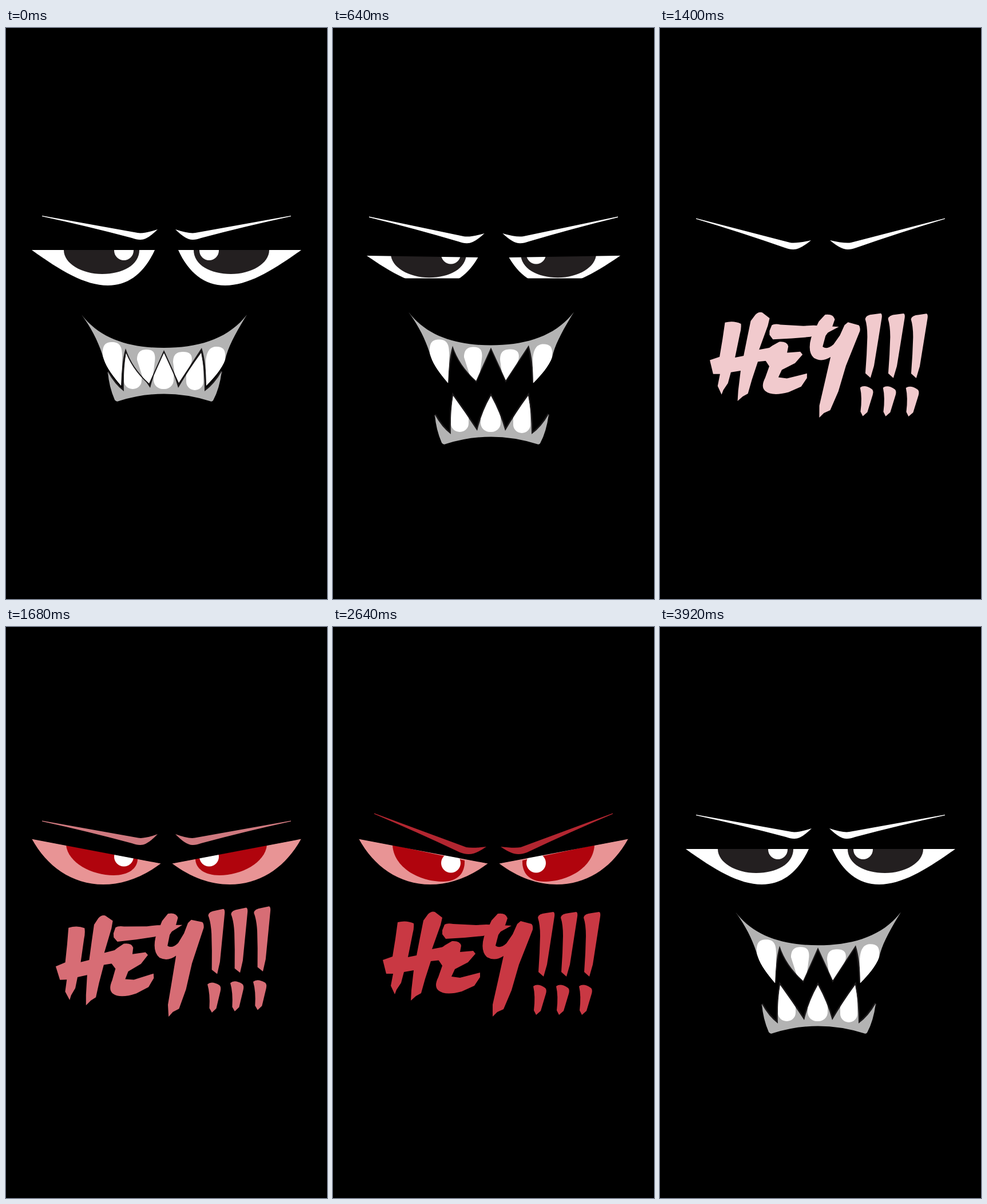
Animation of 561x998 px, one loop 3.96 s. Source, as an HTML page:

```html
<!DOCTYPE html>
<html lang="en">
<head>
<meta charset="utf-8">
<title>Hey!!!</title>
<style>
  html, body { margin: 0; width: 100%; height: 100%; overflow: hidden; background: #000; }
  svg { display: block; width: 100vw; height: 100vh; }
</style>
</head>
<body>
<svg viewBox="0 0 561 998" preserveAspectRatio="xMidYMid meet">
  <defs>
    <clipPath id="eyeClip"><path id="eyeEdge"/></clipPath>

    <g id="side">
      <path id="eye"/>
      <g clip-path="url(#eyeClip)">
        <path id="iris"/>
        <circle id="glint" cx="206" r="17" fill="#fff"/>
      </g>
      <path id="lids" fill="#000"/>
      <path id="brow"/>
    </g>

    <path id="upperShape" d="M132 501C164 543 215 559 276 559C337 559 389 543 421 501C402 532 388 557 383 580C377 596 364 611 350 625C350 600 348 578 342 559L302 620L276 563L250 621Q220 594 209 560C203 580 202 602 201 625C188 610 176 594 171 579C163 552 151 527 132 501Z"/>
    <path id="lowerShape" d="M178 601Q190 623 206 635Q205 596 210 568Q231 597 252 629Q260 596 276 568Q292 597 301 629Q319 598 341 568Q347 598 347 635Q364 623 377 600Q373 631 362 651Q360 654 356 652Q276 627 197 652Q193 654 190 650Q180 627 178 601Z"/>
    <clipPath id="upperClip"><use href="#upperShape"/></clipPath>
    <clipPath id="lowerClip"><use href="#lowerShape"/></clipPath>

    <g id="bang">
      <path d="M358 508Q359 501 372 500L385 498Q388 499 387 506L381 545L374 590L368 611L359 603L361 570L362 540Q362 520 358 508Z"/>
      <path d="M350 628Q358 622 371 631Q374 634 372 641L363 671L355 678L351 670Q354 645 350 628Z"/>
    </g>
  </defs>

  <rect width="561" height="998"/>
  <use href="#side"/>
  <use href="#side" transform="translate(561) scale(-1 1)"/>

  <g id="mouth" fill="#b3b3b3">
    <g id="lower">
      <path d="M178 601Q190 623 206 635Q205 596 210 568Q231 597 252 629Q260 596 276 568Q292 597 301 629Q319 598 341 568Q347 598 347 635Q364 623 377 600" fill="none" stroke="#1b191a" stroke-width="5"/>
      <use href="#lowerShape"/>
      <g clip-path="url(#lowerClip)" fill="#fff">
        <rect x="206" y="540" width="31" height="91" rx="15"/>
        <rect x="258" y="540" width="35" height="91" rx="16"/>
        <rect x="315" y="540" width="30" height="93" rx="15"/>
      </g>
    </g>
    <g id="upper">
      <path d="M201 625Q202 590 209 560Q220 594 250 621L276 563L302 620L342 559Q349 590 350 625" fill="none" stroke="#1b191a" stroke-width="4"/>
      <use href="#upperShape"/>
      <g clip-path="url(#upperClip)" fill="#fff">
        <path d="M169 572C168 554 174 549 185 549C198 549 203 556 203 572V640H169Z"/>
        <path d="M229 580C229 566 236 562 246 562C258 562 262 569 260 583L254 630H245Z"/>
        <path d="M292 584C292 570 299 566 310 566C322 566 327 572 324 585L306 630H298Z"/>
        <path d="M349 585C350 564 357 557 368 557C380 557 384 563 383 577L376 640H347Z"/>
      </g>
    </g>
  </g>

  <g id="word" role="img" aria-label="HEY!!!">
    <path d="M113 516Q128 512 141 518Q142 526 139 537L131 577L146 574L152 543L158 513L166 502Q172 496 178 498L191 508L188 521L173 563L204 557L190 582L171 584L161 615L154 640L145 645L136 653L137 635L141 600L124 603L119 622L111 634L108 642L101 627L105 606L93 606L87 582L104 576L109 545Z"/>
    <path d="M191 530L195 520Q200 517 210 519L250 521L268 520L312 522L290 534L262 540L230 543L197 545L191 537Z"/>
    <path d="M196 556L208 549Q222 548 224 557L222 568L245 566L249 571L236 586L213 598L207 611L222 613L257 604L257 612L247 627L225 637Q196 645 184 635Q176 628 184 612L191 592L183 580L185 564Z"/>
    <path d="M288 501Q302 499 305 509L301 521L289 538L284 557Q292 563 303 553L314 537L322 519L328 514L347 519Q350 522 349 529L340 552L325 590L312 635L298 668L287 673L279 681L279 660L288 620L298 575Q283 585 269 577Q257 566 264 541L277 513Z"/>
    <use href="#bang"/>
    <use href="#bang" x="40"/>
    <use href="#bang" x="80"/>
  </g>
</svg>

<script>
const LOOP = 3960, STEP = 40;
const WORD_IN = 1120, RED_IN = 1400, RESET = 3640;
const SHAKE = [0, 3.4, 7, -3.6];
const EYE = {
  white: "M45 388C95 424 138 450 178 450C214 450 242 428 260 388Z",
  red: "M45 370L271 413C238 438 203 450 170 450C115 450 71 418 45 370Z"
};
const WHITE_IRIS = "M101 360V388C101 412 133 430 168 430C204 430 233 414 233 388V360Z";
// Iris curve: start, then two cubic segments
const IRIS_CALM = [105, 381, 108, 412, 150, 434, 188, 434, 214, 434, 230, 422, 230, 405];
const IRIS_WIDE = [104, 381, 106, 420, 150, 445, 192, 445, 218, 445, 231, 430, 230, 408];
// Brow points: outer tip, upper corner, inner tip, lower corner
const BROW = {
  rest: [63, 328.5, 235, 359, 265, 352, 234, 370],
  low: [63, 333, 232, 376, 264, 371, 232, 387],
  red: [63, 339, 236, 369.5, 265, 362, 234, 381],
  raised: [72, 326, 238, 386, 268, 384, 236, 397]
};

const $ = id => document.getElementById(id);
const set = (id, attrs) => { for (const k in attrs) $(id).setAttribute(k, attrs[k]); };
const ramp = (t, a, b) => Math.min(1, Math.max(0, (t - a) / (b - a)));
const ease = x => (1 - Math.cos(Math.PI * x)) / 2;
const mix = (a, b, k) => a.map((v, i) => v + (b[i] - v) * k);
const tint = (a, b, k) => `rgb(${mix(a, b, k).map(Math.round)})`;
const WHITE = [255, 255, 255];

function browPath([tx, ty, cx, cy, ex, ey, bx, by]) {
  const midX = (tx + bx - 14) / 2, midY = (ty + by - 3) / 2 - 1.5;
  return `M${tx} ${ty - .6}L${cx - 5} ${cy - 1}Q${cx + 6} ${cy + 1} ${ex} ${ey}` +
    `Q${bx + 12} ${by + 1} ${bx} ${by}Q${bx - 6} ${by} ${bx - 14} ${by - 3}` +
    `Q${midX} ${midY} ${tx} ${ty + .8}Z`;
}

function lidPath(left, right, bottom) {
  return `M30 330H280V${right}L30 ${left}ZM30 ${bottom}H280V460H30Z`;
}

// 0 is open, 1 is shut
function blink(t) {
  if (t < 520) return ease(ramp(t, 400, 520));
  if (t < 1000) return 1 - ease(ramp(t, 540, 710));
  if (t < RED_IN) return ease(ramp(t, 1180, 1360));
  return 1 - ease(ramp(t, 1420, 1680));
}

function drawFace(t) {
  const red = t > RED_IN && t < RESET;
  const shut = t < RESET ? blink(t) : 0;
  const alert = ease(ramp(t, 2120, 2640)) * (1 - ease(ramp(t, 2640, 3200)));
  const shape = red ? EYE.red : EYE.white;
  set("eye", { d: shape, fill: red ? "#e89495" : "#fff" });
  set("eyeEdge", { d: shape });

  if (red) {
    const p = mix(IRIS_CALM, IRIS_WIDE, alert);
    set("iris", { d: `M${p.slice(0, 2)}C${p.slice(2)}Z`, fill: "#b0040d", transform: "" });
    set("glint", { cy: 401.5 + 11 * alert });
    set("lids", { d: lidPath(367.7 + 58 * shut, 415.3 + 58 * shut, 452 - 30 * shut) });
  } else {
    set("iris", { d: WHITE_IRIS, fill: "#231f20", transform: `translate(0 ${17 * shut})` });
    set("glint", { cy: 389 + 18 * shut });
    set("lids", { d: lidPath(388 + 26 * shut, 388 + 37 * shut, 452 - 40 * shut) });
  }

  const base = red ? mix(BROW.red, BROW.low, shut) : mix(BROW.rest, BROW.low, shut);
  set("brow", {
    d: browPath(mix(base, BROW.raised, alert)),
    fill: red ? tint(WHITE, [178, 38, 48], ramp(t, 1420, 1840)) : "#fff"
  });
}

function drawMouth(t) {
  const shown = t < WORD_IN || t >= RESET;
  set("mouth", { visibility: shown ? "visible" : "hidden" });
  const phase = t >= RESET ? t - LOOP : t;
  const open = Math.abs(Math.sin(Math.PI * phase * 4.5 / 640));
  set("lower", { transform: `translate(0 ${75 * open})` });
  set("upper", { transform: `translate(0 ${-4.5 * open * open})` });
}

function drawWord(t) {
  const shown = t >= WORD_IN && t < RESET;
  set("word", { visibility: shown ? "visible" : "hidden" });
  const still = t >= 1880 && t < 2120 || t >= 3280;
  const end = t < 2000 ? 1880 : 3280;
  const beat = (((t - end) / STEP) % 4 + 4) % 4;
  const angle = (still ? 0 : SHAKE[beat]) + (t < 1720 ? .4 : 0);
  set("word", {
    transform: `rotate(${angle} 287 589)`,
    fill: tint(WHITE, [201, 56, 67], ramp(t, 1240, 1840))
  });
}

function frame() {
  const t = Math.floor(performance.now() % LOOP / STEP) * STEP;
  drawFace(t);
  drawMouth(t);
  drawWord(t);
  requestAnimationFrame(frame);
}
frame();
</script>
</body>
</html>
```
